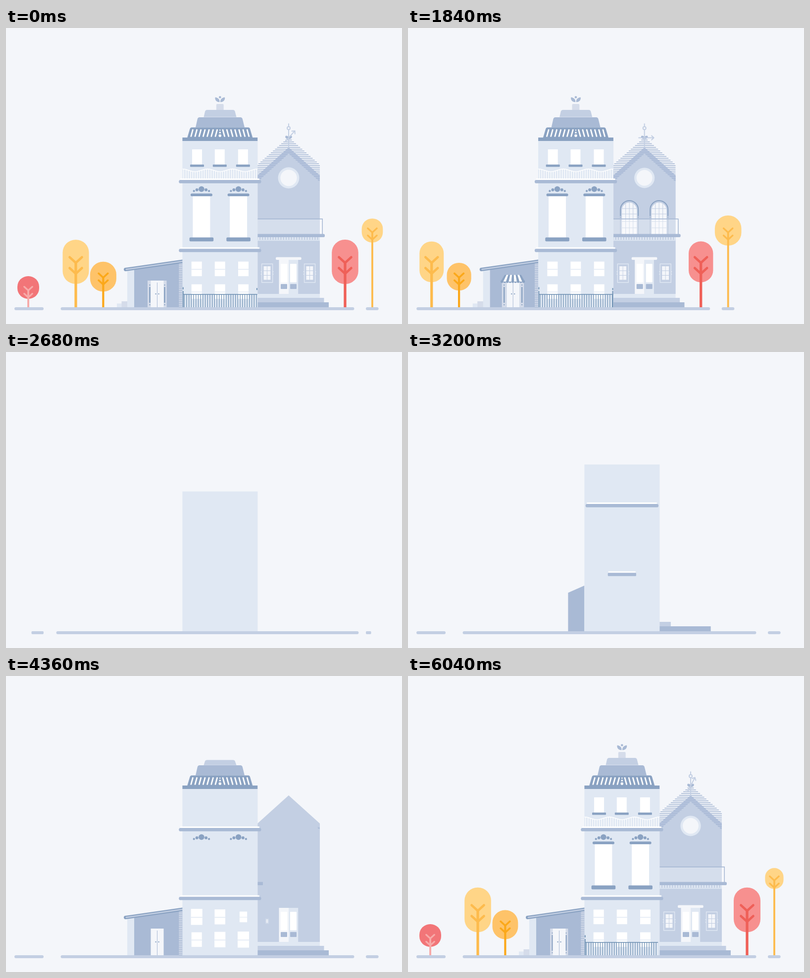
An HTML page that plays this animation: 800 by 600 pixels, repeating every 6.08 s.

```html
<!DOCTYPE html>
<html lang="en">
<head>
<meta charset="utf-8">
<title>Street</title>
<style>
html, body { margin: 0; width: 100%; height: 100%; overflow: hidden; background: #f4f6fa; }
svg { display: block; width: 100vw; height: 100vh; }
</style>
</head>
<body>
<svg id="stage" viewBox="0 0 800 600"></svg>
<script>
const LOOP = 6080, SLIDE = 1650, REBUILD = 2370;
const BG = '#f4f6fa', LIGHT = '#e0e8f3', PALE = '#d5dcea', MID = '#c3cfe3',
      BLUE = '#a9bad5', DARK = '#8aa2c2', FENCE = '#7293b5', WHITE = '#fff';

// easing
const clamp = u => Math.min(1, Math.max(0, u));
const out = u => 1 - (1 - u) ** 3;
const linear = u => u;
const inOut = u => u < .5 ? 2 * u * u : 1 - 2 * (1 - u) ** 2;
const over = s => u => 1 + s * (1 - u) ** 2 - (s + 1) * (1 - u) ** 3;
const back = over(1.7), soft = over(1), firm = over(1.5), strong = over(2.6);
const prog = (t, t0, dur, ease = linear) => {
  const u = clamp((t - t0) / dur);
  return u === 0 ? 0 : u === 1 ? 1 : ease(u);
};

// shapes
const rect = (x, y, w, h, fill, r = 0) =>
  `<rect x="${x}" y="${y}" width="${w}" height="${h}" rx="${r}" fill="${fill}"/>`;
const dot = (x, y, r, fill) => `<circle cx="${x}" cy="${y}" r="${r}" fill="${fill}"/>`;
const shape = (d, fill) => `<path d="${d}" fill="${fill}"/>`;
const line = (d, color, w, extra = '') =>
  `<path d="${d}" fill="none" stroke="${color}" stroke-width="${w}" ${extra}/>`;
const round = 'stroke-linecap="round" stroke-linejoin="round"';
const repeat = (n, fn) => Array.from({ length: n }, (_, i) => fn(i)).join('');

// parts: every one has an id and a function of time giving its transform
let defs = '', body = '';
const parts = [];
const scaling = (t0, dur, ox, oy, axis, ease) => t => {
  const k = prog(t, t0, dur, ease);
  const sx = axis === 'y' && k ? 1 : k, sy = axis === 'x' && k ? 1 : k;
  return `translate(${ox} ${oy}) scale(${sx} ${sy}) translate(${-ox} ${-oy})`;
};
function move(html, fn) {
  body += `<g id="p${parts.length}">${html}</g>`;
  parts.push(fn);
}
function grow(html, t0, dur, ox, oy, axis = 'xy', ease = back) {
  move(html, scaling(t0, dur, ox, oy, axis, ease));
}
function wipe(html, t0, dur, box, ox, oy, axis, ease = out) {
  const n = parts.length;
  defs += `<clipPath id="c${n}"><rect id="p${n}" x="${box[0]}" y="${box[1]}" width="${box[2]}" height="${box[3]}"/></clipPath>`;
  body += `<g clip-path="url(#c${n})">${html}</g>`;
  parts.push(scaling(t0, dur, ox, oy, axis, ease));
}

function ground() {
  grow(rect(110.5, 566, 593, 6, MID, 3), REBUILD, 410, 407, 569, 'x', soft);
  grow(rect(17, 566, 59, 6, MID, 3), 2620, 500, 76, 569, 'x', soft);
  grow(rect(727, 566, 25.7, 6, MID, 3), 2620, 500, 727, 569, 'x', soft);
}

// block that drops, squashes and recovers
function block(x, y, w, h, fill, t0) {
  const cx = x + w / 2, base = y + h;
  move(rect(x, y, w, h, fill), t => {
    if (t < t0) return 'scale(0)';
    const u = clamp((t - t0) / 250), q = Math.sin(Math.PI * prog(t, t0 + 250, 150));
    const sx = u < 1 ? .4 + .6 * u * u + .05 * u : 1 + .2 * q;
    const sy = u < 1 ? 1.2 - .2 * u : 1 - .3 * q;
    return `translate(${cx} ${base - 70 * (1 - u * u)}) scale(${sx} ${sy}) translate(${-cx} ${-base})`;
  });
}

function shed() {
  block(224, 558.5, 10, 7.5, LIGHT, 5037);
  block(233.5, 554, 12, 12, PALE, 4835);
  const drop = t => 1 - prog(t, 3720, 420, back);
  move(rect(245, 489, 14.5, 77, LIGHT), t =>
    `translate(0 566) scale(1 ${prog(t, 3500, 200, out) * (1 + .19 * drop(t))}) translate(0 -566)`);
  grow(shape('M259 566V488L357 473.5V566z', BLUE), 3150, 400, 356, 566, 'x', out);
  wipe(repeat(24, i => rect(349.3, 562.6 - i * 3.7, 7, 2, PALE)),
    3505, 375, [349, 477, 8, 89], 349, 566, 'y', linear);
  move(line('M241.5 489.5L360 472.5', DARK, 7, round) + line('M243 489.3L360 472.5', MID, 2.4, round), t =>
    t < 3570 ? 'scale(0)' :
    `translate(${122 * (1 - prog(t, 3570, 130, out))} 0) rotate(${9 * drop(t)} 360 472.5)`);
  [[283, 1], [318.5, -1]].forEach(([x, dir]) => {
    const c = 305.5 - dir * 18;
    move(rect(x, 512, 9, 54, PALE) + rect(c - 1.3, 525, 2.6, 32, DARK) +
      dot(c, 521, 1.2, DARK) + dot(c, 561, 1.2, DARK), t =>
      t < 5900 ? 'scale(0)' : `translate(${dir * 9 * (1 - prog(t, 5914, 900, back))} 0)`);
  });
  grow(rect(292.5, 512, 26, 54, BG) + line('M305.5 516V566', BLUE, 1) +
    dot(302.5, 539, 1.2, DARK) + dot(308.5, 539, 1.2, DARK), 3250, 300, 305.5, 566, 'y', out);
  const top = i => 288.5 + i * 33.5 / 9, low = i => 280.5 + i * 49 / 9;
  grow(repeat(9, i => dot(low(i + .5), 514, 2.7, DARK)) +
    repeat(9, i => shape(`M${top(i)} 500.5H${top(i + 1)}L${low(i + 1)} 514H${low(i)}z`, i % 2 ? WHITE : DARK)),
    100, 0, 305, 500.5);
  parts[parts.length - 1] = scaling(LOOP + 100, 700, 305, 500.5, 'y', back);
}

function sideWindow(x, t0) {
  const c = x + 11.5;
  grow(line(`M${x + .6} 478.2h22v37.6h-22z`, LIGHT, 1.4) +
    rect(x - 1.2, 493, 1.6, 2, LIGHT) + rect(x - 1.2, 498, 1.6, 2, LIGHT) +
    rect(x + 22.8, 493, 1.6, 2, LIGHT) + rect(x + 22.8, 498, 1.6, 2, LIGHT) +
    repeat(6, i => rect(c - 7 + i % 2 * 7.4, 483 + (i >> 1) * 9.5, 6.5, 8.4, BG)), t0, 500, c, 497);
}

function archWindow(c, t0) {
  grow(shape(`M${c - 15} 418V369a15 15 0 0 1 30 0V418z`, BG) +
    line(`M${c - 18} 380V368a18 18 0 0 1 36 0V380`, DARK, 2) +
    line(`M${c - 18} 380V418M${c + 18} 380V418`, DARK, 1.8, 'stroke-dasharray="1.5 1.5"'),
    t0, 580, c, 418, 'y', out);
  wipe(line(`M${c - 7.5} 356V418M${c} 354V418M${c + 7.5} 356V418` +
    [366, 377, 392, 405].map(y => `M${c - 15} ${y}h30`).join(''), MID, 1),
    t0 + 260, 460, [c - 16, 354, 32, 64], c, 418, 'y', linear);
}

function roofStripes() {
  let s = shape('M571 242L634 299V311L571 254L508 311V299z', '#b6c4de');
  for (let y = 226.3; y < 310; y += 3.7) {
    const a = Math.min(63, 6.5 + (y - 226.3) * 1.135), b = Math.max(0, (y - 254) * 1.1);
    s += rect(571 - a, y, a - b, 1.6, BLUE) + rect(571 + b, y, a - b, 1.6, BLUE);
  }
  return s;
}

function house() {
  wipe(rect(508, 556, 144, 10, BLUE), 3080, 350, [508, 550, 144, 17], 508, 560, 'x');
  wipe(rect(508, 547, 134.5, 9, MID), 3180, 350, [508, 540, 135, 17], 508, 550, 'x');
  wipe(rect(508, 539, 126, 8, LIGHT), 3270, 330, [508, 535, 126, 13], 508, 540, 'x');
  const panels = [555, 574].map(x =>
    rect(x, 478, 13, 37.5, WHITE, 1) + rect(x, 519, 13, 10, BLUE, 1)).join('');
  grow(shape('M508 539V299L571 242L634 299V539z', MID) +
    rect(551.5, 470, 19.5, 69, BG) + rect(571, 470, 19.2, 69, LIGHT) + panels,
    3640, 680, 571, 539, 'y', firm);
  wipe(roofStripes(), 4350, 500, [508, 222, 126, 90], 571, 312, 'y');
  sideWindow(516, 4330);
  sideWindow(602, 4430);
  grow(rect(545, 464.5, 51.7, 5.5, BG, 2), 5250, 500, 571, 467, 'x');
  grow(dot(571, 303.8, 20.6, LIGHT) + dot(571, 303.8, 16, BG), 5707, 900, 571, 303.8);
  archWindow(540.5, LOOP + 20);
  archWindow(600.5, LOOP + 80);
  wipe(repeat(24, i => rect(509 + i * 5.3, 424, 2.8, 5.5, LIGHT)) + rect(508, 429.6, 126, 1.6, LIGHT),
    4550, 400, [508, 423, 126, 10], 508, 424, 'x');
  wipe(`<g opacity=".3">${rect(508, 387, 131, 31, WHITE)}</g>`, 5074, 600, [508, 386, 132, 32], 508, 400, 'x');
  wipe(line('M508 387.1H639.2V418', BLUE, 1.6), 5056, 600, [508, 385, 132.5, 34], 508, 400, 'x');
  wipe(rect(500, 417.5, 144, 6.5, BLUE, 2.5), 4350, 400, [508, 416, 137, 9], 508, 420, 'x');
  grow(shape('M571 225C565.5 225.5 563.5 222 564.5 219C568 217.5 571 220 571 222C571 220 574 217.5 577.5 219C578.5 222 576.5 225.5 571 225z', BLUE),
    4800, 350, 571, 225, 'xy', out);
  grow(line('M571 193.5V200M571 206V243', MID, 2) +
    `<circle cx="571" cy="203" r="3" fill="none" stroke="${MID}" stroke-width="2"/>`,
    5580, 400, 571, 240, 'y', out);
  move(line('M559.5 222.6H590M585.5 218.4L590 222.6L585.5 226.8', MID, 2, round), t =>
    t < 5940 ? 'scale(0)' : `rotate(${-90 * (1 - prog(t, 5977, 900, back))} 571 222.6)`);
}

function cornice(y, t0) {
  grow(rect(352, y, 160, 4, WHITE, 1) + rect(349.2, y + 3, 166.4, 6.8, BLUE, 3.4), t0, 420, 432.3, y, 'x', soft);
}

function tallWindow(c, t0) {
  wipe(rect(c - 17.5, 340, 35, 86, WHITE), t0 + 460, 450, [c - 18, 341, 36, 84], c, 341, 'y');
  grow(rect(c - 22, 335.5, 44, 5.5, DARK, 2.5), t0, 450, c, 338, 'x');
  grow(rect(c - 24.3, 424.5, 48.6, 8, DARK, 2), t0 + 850, 450, c, 428, 'x');
  grow(dot(c, 326.5, 5.8, DARK), 3460, 500, c, 326.5, 'xy', strong);
  [-1, 1].forEach(d => {
    grow(dot(c + d * 9.2, 328, 3, DARK), 3685, 500, c + d * 10, 328);
    grow(dot(c + d * 15.2, 330.4, 2.1, DARK), 3800, 500, c + d * 15.2, 330.4);
  });
}

function tierSlots() {
  return repeat(7, i => [-1, 1].map(d => {
    const x = 432.3 + d * (8.3 + i * 8.2);
    return line(`M${x + d} 219.5L${x - d * 2.6} 206.5`, WHITE, 2.8, round);
  }).join('')) + dot(432.3, 218.3, 2.7, WHITE) + dot(432.3, 212, 1.8, WHITE) + dot(432.3, 207, 1.2, WHITE);
}

function tower() {
  const mid = 432.3;
  const leaf = 'M431.5 150.2C425 150.2 421.5 145.5 422.6 140.5C428.5 141 432.2 145 431.5 150.2z';
  grow(shape(leaf, BLUE) + `<g transform="translate(864.6 0) scale(-1 1)">${shape(leaf, BLUE)}</g>` +
    dot(mid, 140.2, 2.3, BLUE), 4650, 450, mid, 152, 'xy', out);
  grow(rect(424.8, 154, 14.9, 14, PALE, 2), 4480, 350, mid, 166, 'y', out);
  grow(shape('M399.5 180.5L402 169.5Q402.8 166 406.5 166H458.5Q462 166 462.7 169.5L465.5 180.5z', MID),
    4230, 380, mid, 181, 'y', out);
  grow(shape('M383 201.5L386.8 184.5Q387.6 181 391 181H473.5Q477 181 477.8 184.5L482 201.5z', BLUE),
    3920, 400, mid, 201.5, 'y', out);
  grow(shape('M366 223L371.5 204.5Q372.5 201.5 375.5 201.5H489Q492.2 201.5 493 204.5L498.5 223z', DARK) + tierSlots(),
    3708, 420, mid, 222, 'y', soft);
  grow(rect(356.4, 228, 152, 338, LIGHT), 2493, 680, mid, 566, 'y', firm);
  grow(rect(356.4, 222, 151.8, 7, DARK), 3535, 700, mid, 225, 'x');

  [386, 431.8, 478.8].forEach((c, i) => {
    wipe(rect(c - 10, 246, 20, 32, WHITE), 5350 + i * 80, 350, [c - 11, 246, 22, 31.5], c, 277, 'y');
    grow(rect(c - 14, 276.8, 28, 4.8, DARK, 1), 5250 + i * 80, 400, c, 279, 'x');
  });

  const wave = x => 288.5 - 2.7 * Math.cos((x - 356.5) / 50.5 * 2 * Math.PI);
  let crest = '', bars = '';
  for (let x = 356.5; x <= 508; x += 2.525) crest += `${crest ? 'L' : 'M'}${x} ${wave(x)}`;
  for (let x = 359; x < 508; x += 4.6) bars += `M${x} ${wave(x)}V306`;
  wipe(line(crest, WHITE, 1.5) + line(bars, WHITE, 1.3), 4500, 500, [356.4, 283, 151.8, 24], 356.4, 306, 'x');

  cornice(305, 3050);
  cornice(444.5, 3160);
  tallWindow(394.9, 4400);
  tallWindow(469.6, 4400);

  [519.5, 473.5].forEach((y, row) => [385.2, 432.2, 479.5].forEach((c, i) =>
    grow(rect(c - 10.5, y, 21, 29.6, WHITE) + rect(c - 10.5, y + 15, 21, 1.4, LIGHT),
      3900 + row * 180 + i * 90, 480, c, y + 15)));
}

function fence() {
  wipe(rect(357, 539.2, 151, 1.6, FENCE) + repeat(32, i => rect(359.6 + i * 4.7, 540, 1.3, 26, FENCE)),
    5450, 655, [357.5, 535, 150.5, 31], 357.5, 550, 'x', inOut);
  wipe(rect(356.8, 525.3, 2, 4.8, FENCE, .8) + rect(356.8, 533, 2, 33, FENCE),
    4900, 240, [356, 525, 3, 41], 357, 566, 'y');
  wipe(rect(505.9, 527, 2, 4.4, FENCE, .8) + rect(505.9, 533, 2, 33, FENCE),
    6068, 300, [505, 527, 4, 39], 507, 527, 'y');
}

// x, crown box, fork heights, fork spread, trunk width, colours, start times
function tree(x, cy, w, h, forks, spread, tw, fill, stroke, trunkAt, crownAt) {
  grow(rect(x - w / 2, cy - h / 2, w, h, fill, Math.min(w, h) * .49), crownAt, 900, x, cy);
  const rise = spread * .92;
  const v = forks.map(y => `M${x - spread} ${y - rise}L${x} ${y}L${x + spread} ${y - rise}`).join('');
  grow(line(`M${x} ${forks[0]}V566`, stroke, tw) + line(v, stroke, tw * .88, round), trunkAt, 600, x, 566);
}

ground();
house();
shed();
tower();
fence();
tree(45, 526, 40, 41.8, [532, 546], 8.2, 3.9, '#f27578', '#f7aaa9', 5430, 5538);
tree(141, 474, 49, 82.7, [476, 498], 12.5, 5.3, '#ffd587', '#fdbb4d', 5055, 5464);
tree(196.4, 504, 49.2, 56, [506, 520], 9.3, 4.2, '#fec369', '#fba81a', 5195, 5653);
tree(685, 474, 49.4, 82.9, [476, 498], 12.5, 5.3, '#f7908f', '#ef6058', 5055, 5464);
tree(740, 410.5, 53.6, 61, [414.5, 429], 9.2, 3.8, '#ffd587', '#fdbb4d', 5440, 5865);

const stage = document.getElementById('stage');
stage.innerHTML = `<defs>${defs}</defs><rect width="800" height="600" fill="${BG}"/><g id="street">${body}</g>`;
const street = document.getElementById('street');
const nodes = parts.map((_, i) => document.getElementById('p' + i));

function draw(t) {
  const b = t < REBUILD ? t + LOOP : t;
  const gone = t > SLIDE && t < REBUILD ? 464.4 * ((t - SLIDE) / 510) ** 1.634 : 0;
  street.setAttribute('transform', `translate(${-gone} 0)`);
  parts.forEach((fn, i) => nodes[i].setAttribute('transform', fn(b)));
}

const begin = performance.now();
function tick() {
  draw((performance.now() - begin) % LOOP);
  requestAnimationFrame(tick);
}
tick();
</script>
</body>
</html>
```
